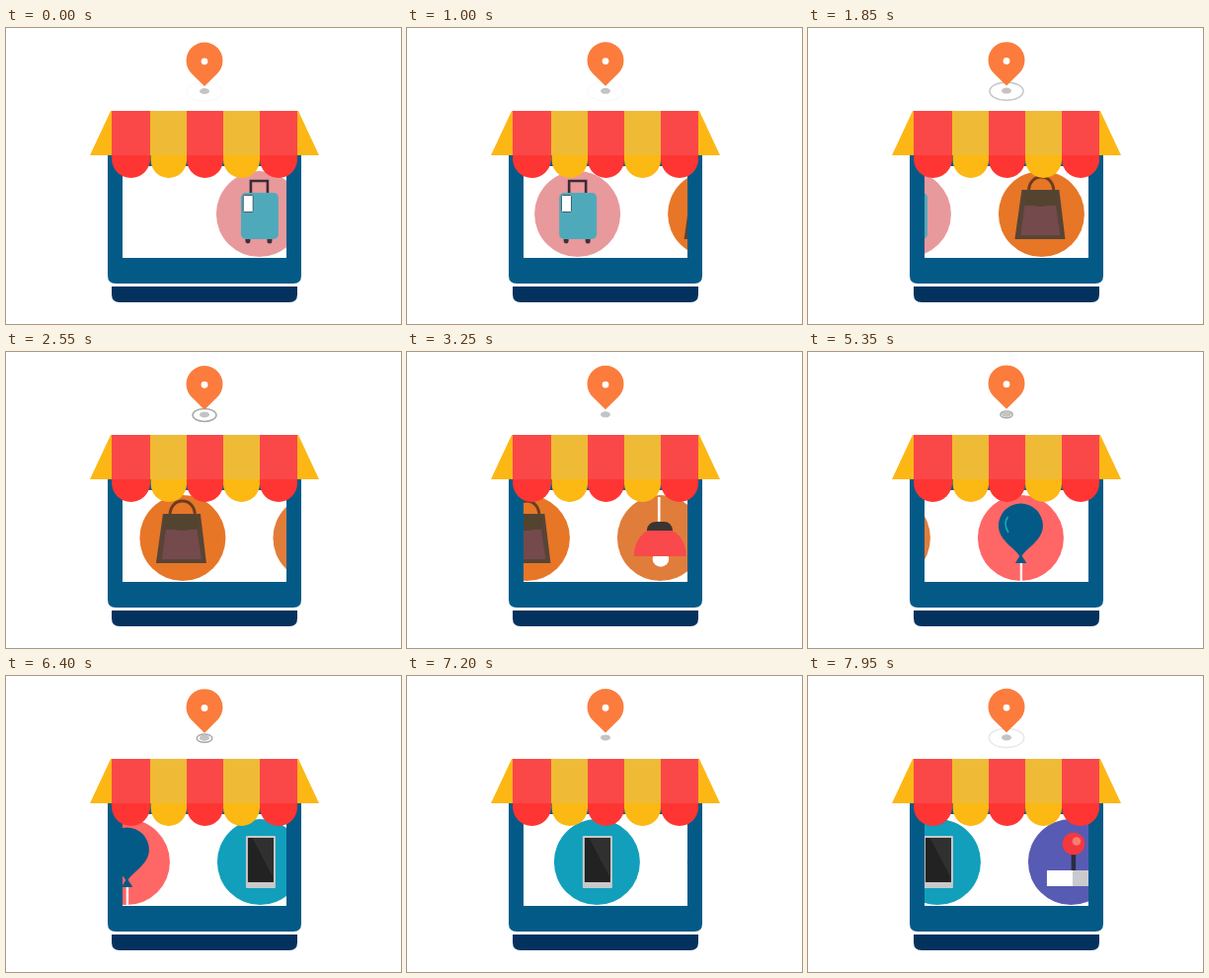
These frames come from a looping animation (400x300 px, 8 s). An HTML page:

```html
<!DOCTYPE html>
<html lang="en">
<head>
<meta charset="utf-8">
<title>Online shop</title>
<style>
  html, body { margin: 0; width: 100%; height: 100%; overflow: hidden; background: #fff; }
  svg { display: block; width: 100%; height: 100%; }
</style>
</head>
<body>
<svg viewBox="0 0 400 300">
  <defs>
    <clipPath id="screen"><rect x="118" y="140" width="166" height="93"/></clipPath>
  </defs>

  <!-- laptop -->
  <path d="M103 128H299V251Q299 259 291 259H111Q103 259 103 251Z" fill="#045a87"/>
  <rect x="118" y="140" width="166" height="93" fill="#fff"/>
  <path d="M107 262H295V270Q295 278 287 278H115Q107 278 107 270Z" fill="#03325e"/>

  <!-- goods, each drawn around x = 0 -->
  <g clip-path="url(#screen)">
    <g class="item">
      <circle cy="188.5" r="43.5" fill="#e8999c"/>
      <path d="M-8.5 167V155H8.5V167" fill="none" stroke="#3b2c36" stroke-width="2.6"/>
      <path d="M-14 212h5v4a2.5 2.5 0 0 1-5 0zM8 212h5v4a2.5 2.5 0 0 1-5 0z" fill="#40303a"/>
      <rect x="-18.5" y="167" width="38" height="47" rx="5" fill="#4eaabb"/>
      <rect x="-16.2" y="169.5" width="10" height="17" rx="1" fill="#fff" stroke="#3f5b66"/>
    </g>
    <g class="item">
      <circle cy="188.5" r="43.5" fill="#e77627"/>
      <path d="M-13 166C-13 146 12.500 146 12.500 166" fill="none" stroke="#6b3c20" stroke-width="3"/>
      <path d="M-20 164H18L24 214H-27Z" fill="#574436"/>
      <path d="M-17 180H14.500L19 210H-21Z" fill="#744a4d"/>
      <path d="M-19 165H17L15 178Q-1 184-17 178Z" fill="#53442f"/>
    </g>
    <g class="item">
      <circle cy="188.500" r="43.5" fill="#e17d3b"/>
      <rect x="-2.500" y="147" width="2.600" height="26" fill="#fff"/>
      <circle cx=".5" cy="209.500" r="8.300" fill="#fff"/>
      <path d="M-13.500 182V180Q-12 172-4 172H4Q11 172 12.500 180V182Z" fill="#3b3531"/>
      <path d="M-26.500 207V203C-25 192-19 184-13 181H12C19 184 25 192 26 203V207Z" fill="#f9494c"/>
    </g>
    <g class="item">
      <circle cy="188.5" r="43.5" fill="#ff6666"/>
      <path d="M.5 213V233" stroke="#fff" stroke-width="2.4"/>
      <path d="M0 209C-3 200-22.500 192-22.500 176A22.500 22.500 0 0 1 22.500 176C22.500 192 3 200 0 209Z" fill="#045a87"/>
      <path d="M0 205L6 214H-5.500Z" fill="#045a87"/>
      <path d="M-13 167Q-18 174-12.500 183" fill="none" stroke="#18aabf" stroke-width="1.6"/>
    </g>
    <g class="item">
      <circle cy="188.5" r="43.5" fill="#129fbb"/>
      <rect x="-14.500" y="162" width="30" height="53" rx="1" fill="#c9c9c9"/>
      <rect x="-12.500" y="164" width="26" height="45" fill="#222"/>
      <path d="M-8 164H13.500V205Z" fill="#303030"/>
    </g>
    <g class="item">
      <circle cy="188.5" r="43.5" fill="#585bb3"/>
      <rect x=".2" y="178" width="4.500" height="20" fill="#2c2b42"/>
      <circle cx="2.500" cy="170" r="11.300" fill="#f5383d"/>
      <circle cx="5.500" cy="167.500" r="4.300" fill="#f97c72"/>
      <rect x="-24.500" y="197" width="27" height="16" fill="#fff"/>
      <rect x="1.500" y="197" width="27" height="16" fill="#c8cacd"/>
    </g>
  </g>

  <!-- awning -->
  <path d="M106 84H296L317 129H85Z" fill="#fcb714"/>
  <g id="awning"></g>

  <!-- map pin -->
  <g id="marker">
    <ellipse id="ring" cx="201" cy="64.500" fill="#fff" stroke="#a9a9a9" stroke-width="1.5"/>
    <ellipse cx="201" cy="64" rx="5" ry="3" fill="#c4c4c4"/>
    <path d="M201 59L188 46.200A18.500 18.500 0 1 1 214 46.200Z" fill="#fb7c3c"/>
    <circle cx="201" cy="33.800" r="3.400" fill="#fff"/>
  </g>
</svg>
<script>
const LOOP = 8000, START = 256.5, GAP = 135;
// [time, distance the goods have moved left]
const travel = [[0, 0], [1850, 155], [3250, 270], [4500, 379], [5350, 446], [6400, 539], [7950, 665], [8000, 669]];

const items = document.querySelectorAll('.item');
const ring = document.getElementById('ring');
const marker = document.getElementById('marker');

const edges = [107, 146, 183, 220, 257, 295];
document.getElementById('awning').innerHTML = edges.slice(1).map((right, i) => {
  const left = edges[i] + (i === 1 ? 0.6 : 0), w = right - left, r = w / 2;
  const [top, flap] = i % 2 ? ['#efba36', '#fcb813'] : ['#fa4848', '#ff3533'];
  return `<rect x="${left}" y="84" width="${w}" height="45" fill="${top}"/>` +
    `<path d="M${left} 129H${right}V${152 - r}A${r} ${r} 0 0 1 ${left} ${152 - r}Z" fill="${flap}"/>`;
}).join('');

function distance(t) {
  const i = travel.findIndex(k => k[0] > t);
  const [t0, d0] = travel[i - 1], [t1, d1] = travel[i];
  return d0 + (d1 - d0) * (t - t0) / (t1 - t0);
}

function draw(t) {
  const d = distance(t);
  items.forEach((el, i) => el.setAttribute('transform', `translate(${START + GAP * i - d} 0)`));

  marker.setAttribute('transform', `translate(0 ${-1.7 * t / LOOP})`);
  const phase = (t / 1000 + 0.95) % 1;
  const u = Math.max(0, (phase - 0.2) / 0.8);
  const rx = 2.5 + 15.5 * (1 - (1 - u) ** 2);
  ring.setAttribute('rx', rx);
  ring.setAttribute('ry', rx * 0.54);
  ring.setAttribute('opacity', u > 0 ? Math.max(0, Math.min(1, (0.965 - phase) * 4)) : 0);
}

function tick() {
  draw(performance.now() % LOOP);
  requestAnimationFrame(tick);
}
tick();
</script>
</body>
</html>
```
